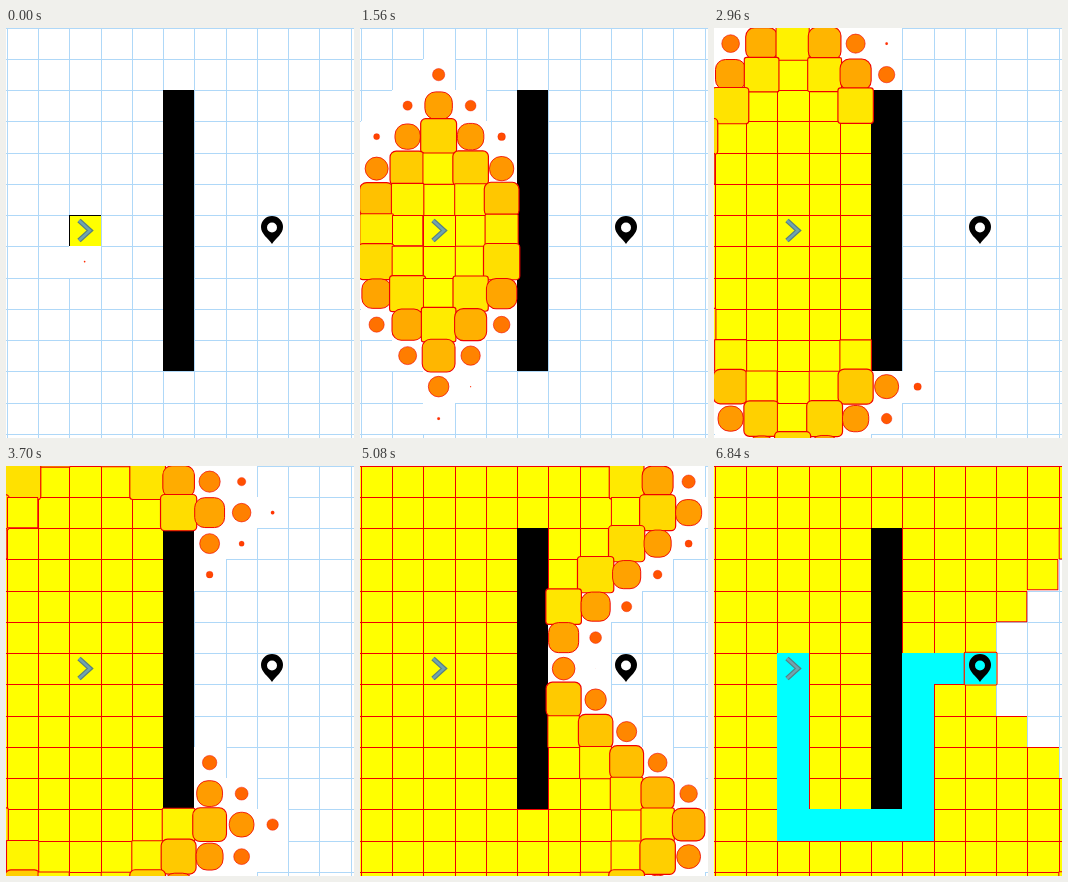
Recreate the animation shown at these times as an HTML page with a canvas. Size 348 by 410 pixels, loop 6.94 s.

```html
<!DOCTYPE html>
<html lang="en">
<head>
<meta charset="utf-8">
<title>Breadth-first search</title>
<style>
  html, body { margin: 0; height: 100%; overflow: hidden; background: #fff; }
  canvas { display: block; }
</style>
</head>
<body>
<canvas id="stage" width="348" height="410"></canvas>
<script>
const ctx = document.getElementById('stage').getContext('2d');
const LOOP = 6940, SIZE = 31.25;
const STEP = 32.7, LEAD = 62, VISIT = 1500;
const PATH_STEP = 40, PATH_TIME = 650;
const COLS = [-1, 14], ROWS = [-1, 13];
const start = { c: 2, r: 6 }, goal = { c: 8, r: 6 };
const RED = '#f00000', BLUE = '#afd8f8', YELLOW = '#ffff00', CYAN = '#00ffff';

const left = c => Math.round(0.9 + SIZE * c);
const top_ = r => Math.floor(SIZE * r);
const key = (c, r) => c + ',' + r;
const isWall = (c, r) => c === 5 && r >= 2 && r <= 10;
const inside = (c, r) => c >= COLS[0] && c <= COLS[1] && r >= ROWS[0] && r <= ROWS[1];
const mix = (a, b, k) => a + (b - a) * k;

// Search down, up, right, left; the visiting order sets the timing.
const seen = new Map();
function search() {
  const first = { ...start, order: 0, parent: null };
  const queue = [first];
  seen.set(key(first.c, first.r), first);
  for (const cell of queue) {
    if (cell.c === goal.c && cell.r === goal.r) return cell;
    for (const [dc, dr] of [[0, 1], [0, -1], [1, 0], [-1, 0]]) {
      const c = cell.c + dc, r = cell.r + dr;
      if (!inside(c, r) || isWall(c, r) || seen.has(key(c, r))) continue;
      const next = { c, r, order: queue.length, parent: cell };
      seen.set(key(c, r), next);
      queue.push(next);
    }
  }
}

const last = search();
for (const [k, cell] of seen) if (cell.order > last.order) seen.delete(k);
const path = [];
for (let cell = last; cell; cell = cell.parent) path.unshift(cell);
const visitTime = cell => cell.order * STEP - LEAD;
const pathStart = visitTime(last);
path.forEach((cell, i) => cell.pathTime = pathStart + i * PATH_STEP);

// cubic-bezier(0, 0, .58, 1)
function easeOut(x) {
  let lo = 0, hi = 1;
  for (let i = 0; i < 14; i++) {
    const s = (lo + hi) / 2;
    if (1.74 * (1 - s) * s * s + s * s * s < x) lo = s; else hi = s;
  }
  return lo * lo * (3 - 2 * lo);
}

// Value along keyframes [position, value], eased within each part.
function track(p, ...keys) {
  for (let i = 1; i < keys.length; i++) {
    const [a, from] = keys[i - 1], [b, to] = keys[i];
    if (p <= b) return mix(from, to, easeOut((p - a) / (b - a)));
  }
  return keys[keys.length - 1][1];
}

function flat(c, r, fill, line) {
  const x = left(c), y = top_(r), w = left(c + 1) - x, h = top_(r + 1) - y;
  ctx.fillStyle = fill;
  ctx.fillRect(x, y, w, h);
  if (!line) return;
  ctx.fillStyle = line;
  ctx.fillRect(x, y, w, 1);
  ctx.fillRect(x, y, 1, h);
}

function tile(cell, scale, radius, fill, line) {
  if (scale <= 0.01) return;
  const side = SIZE * scale, edge = line ? scale : 0, w = side - edge;
  const x = left(cell.c) + (SIZE - w) / 2, y = top_(cell.r) + (SIZE - w) / 2;
  ctx.beginPath();
  ctx.roundRect(x, y, w, w, Math.min(radius, 0.5) * w);
  ctx.fillStyle = fill;
  ctx.fill();
  if (!line) return;
  ctx.strokeStyle = line;
  ctx.lineWidth = edge;
  ctx.stroke();
}

function visited(cell, p) {
  const scale = track(p, [0, 0], [0.75, 1.2], [1, 1]);
  const green = track(p, [0, 36], [0.5, 165], [1, 255]);
  tile(cell, scale, 1 - easeOut(p), `rgb(255,${Math.round(green)},0)`, RED);
}

function arrow() {
  const line = new Path2D('M73 192.5L84 202.5L73 212.5');
  ctx.lineJoin = 'miter';
  for (const [color, width] of [['#587f80', 5], ['#6fa3b0', 2.4]]) {
    ctx.strokeStyle = color;
    ctx.lineWidth = width;
    ctx.stroke(line);
  }
}

function pin() {
  ctx.fillStyle = '#000';
  ctx.fill(new Path2D('M266 216C262 210 255 206 255 199A11 11 0 0 1 277 199C277 206 270 210 266 216Z' +
    'M271 199.5A5 5 0 1 0 261 199.5A5 5 0 1 0 271 199.5Z'), 'evenodd');
}

function draw(t) {
  const moving = [], trail = [];
  ctx.fillStyle = '#fff';
  ctx.fillRect(0, 0, 348, 410);
  for (let r = ROWS[0]; r <= ROWS[1]; r++) {
    for (let c = COLS[0]; c <= COLS[1]; c++) {
      const cell = seen.get(key(c, r));
      if (isWall(c, r)) { flat(c, r, '#000'); continue; }
      if (!cell || t < visitTime(cell)) { flat(c, r, '#fff', BLUE); continue; }
      if (cell.pathTime <= t) {
        const p = (t - cell.pathTime) / PATH_TIME;
        if (p >= 1) { flat(c, r, CYAN); continue; }
        trail.push([cell, p]);
      }
      const p = (t - visitTime(cell)) / VISIT;
      if (cell.order === 0) flat(c, r, YELLOW, t < 80 ? '#000' : RED);
      else if (p >= 1) flat(c, r, YELLOW, RED);
      else moving.push([cell, p]);
    }
  }
  for (const [cell, p] of moving) visited(cell, p);
  for (const [cell, p] of trail) {
    tile(cell, track(p, [0, 0], [0.75, 1.15], [1, 1]), 1 - easeOut(p), CYAN);
  }
  arrow();
  pin();
}

const begin = performance.now();
function frame() {
  draw((performance.now() - begin) % LOOP);
  requestAnimationFrame(frame);
}
frame();
</script>
</body>
</html>
```
